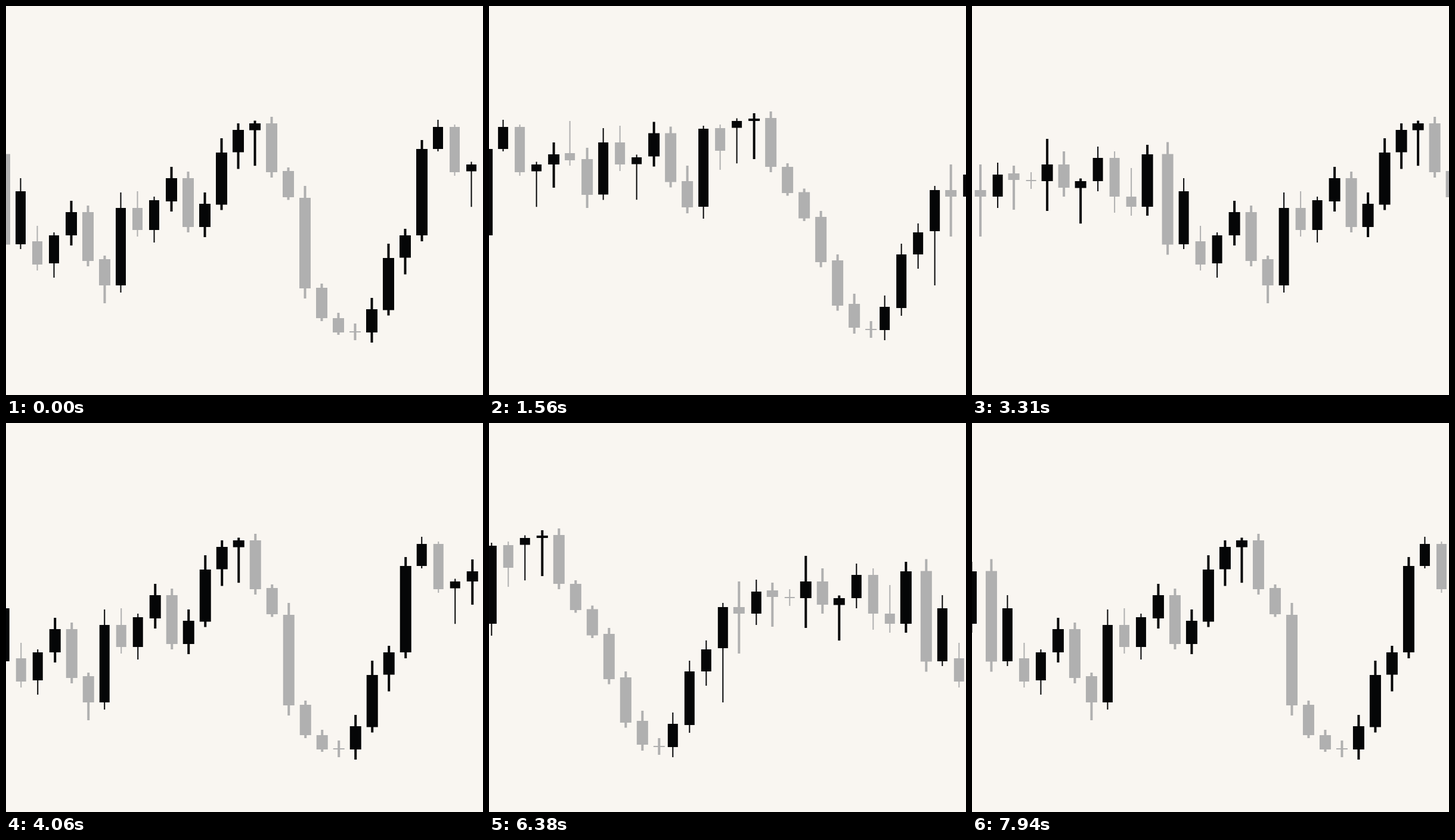
These frames come from a looping animation (800x653 px, 8000 ms). A matplotlib script:

```python
import math

import matplotlib.pyplot as plt
from matplotlib.animation import FuncAnimation
from matplotlib.collections import PolyCollection

W, H, DPI = 800, 653, 64
PAPER, BLACK, GREY = "#f9f6f1", "#050607", "#b0b0b0"
PITCH = 28
LOOP, TICK = 8000, 20      # ms
STEP = 62.5                # ms between visible jumps
SPEED = 14.912             # px per 1/30 s of scroll

# Recurring candles: upper wick, body, lower wick
SPIN = (19, 39, 17)
TALL = (24, 87.5, 9)
FULL = (11, 82, 9)
HAMMER = (4.5, 11.5, 59.7)
DOJI = (13, 2, 13)
SHORT = (6, 44, 4.5)
LOW_TAIL = (11, 37.5, 28)
HIGH_TAIL = (28, 37, 11)
LONG = (20, 152, 17)
DROP = (10, 76, 8.5)

# Each row: colour (b/g, capital = wide cut), top of the body, shape
BASE = [
    ("b", 311, (22, 89, 8)), ("g", 395, (26, 39, 10)), ("b", 385, (5, 47, 24)),
    ("B", 346, SPIN), ("G", 346, FULL), ("G", 425, (6, 44, 30)),
    ("b", 339, (26, 130, 12)), ("g", 339, HIGH_TAIL), ("b", 326, (6, 50, 21)),
    ("B", 289, SPIN), ("G", 289, FULL), ("B", 332, SPIN),
    ("B", 246, TALL), ("B", 208, LOW_TAIL), ("B", 197, HAMMER),
]
DIP = [
    ("G", 197, FULL), ("G", 277, SHORT), ("G", 322, LONG),
    ("G", 473, (7, 51, 5)), ("G", 524, (9, 24, 4)), ("G", 546, DOJI),
    ("B", 509, SPIN), ("B", 423, TALL), ("B", 385, LOW_TAIL),
    ("B", 240, (15, 145, 10)), ("b", 203, (12, 37, 4)),
]
PLATEAU = [
    ("g", 203, (4, 76, 6)), ("b", 266, HAMMER), ("B", 249, (20, 17, 39)),
    ("g", 247, (54, 12, 9)), ("G", 257, (19, 60, 22)), ("b", 229, TALL),
    ("g", 229, HIGH_TAIL), ("b", 254, HAMMER), ("B", 213.5, SPIN),
    ("G", 213.5, FULL), ("G", 294, (26, 44, 10)), ("b", 206, (5, 131, 20)),
    ("g", 205, (6, 38, 32)), ("b", 193, HAMMER), ("B", 189, (9, 4, 64)),
]
SLIDE = [
    ("G", 188, FULL), ("G", 270, SHORT), ("G", 312.5, SHORT),
    ("G", 354, DROP), ("G", 427, DROP), ("G", 500, (17, 40, 10)),
    ("G", 542, DOJI),
]
REBOUND = [
    ("b", 505, SPIN), ("b", 417, (18, 90, 13)), ("b", 380, (15, 37, 24)),
    ("b", 309, (7, 69, 91)), ("G", 309, (43, 11, 67)), ("b", 283, (20, 37, 19)),
    ("G", 281, (13, 11, 50)), ("g", 292, DOJI), ("B", 266, (43, 28, 50)),
    ("G", 266, (22, 39, 15)), ("B", 294, HAMMER), ("b", 255, SPIN),
    ("g", 255, (11, 65, 27)), ("g", 320, (48, 17, 15)), ("B", 249, (16, 88, 15)),
]
LAST = [("G", 248.5, LONG)]


def rect(x, y, w, h):
    return [(x, y), (x + w, y), (x + w, y + h), (x, y + h)]


def candle(x, kind, top, shape, right_aligned):
    up, body, down = shape
    width, wick = (19, 4) if kind.isupper() else (17, 2)
    if right_aligned:
        x += 13 - width
    return [
        rect(x, top, width, body),
        rect(x + (width - wick) / 2, top - up, wick, up + body + down),
    ]


def build_strip():
    """Lay the series end to end often enough for the whole scroll."""
    legs = [BASE, DIP, PLATEAU, SLIDE, REBOUND, LAST]
    count = sum(map(len, legs))
    rects = {"b": [], "g": []}
    for lap in range(-1, 3):
        i = lap * count
        for leg in legs:
            for kind, top, shape in leg:
                x = 16 + PITCH * i
                rects[kind.lower()] += candle(x, kind, top, shape, leg is REBOUND)
                i += 1
    return rects


fig = plt.figure(figsize=(W / DPI, H / DPI), dpi=DPI, facecolor=PAPER)
ax = fig.add_axes([0, 0, 1, 1])
ax.axis("off")
ax.set_ylim(H, 0)

strip = build_strip()
for key, color in (("g", GREY), ("b", BLACK)):
    ax.add_collection(
        PolyCollection(strip[key], facecolor=color, linewidth=0, snap=False),
        autolim=False,
    )


def scroll_at(ms):
    step = int((ms + 4.9) / STEP)
    return SPEED * math.floor(step * STEP * 30 / 1000 + 0.5)


def update(i):
    x = scroll_at(i * TICK)
    ax.set_xlim(x, x + W)
    return ()


update(0)
anim = FuncAnimation(fig, update, frames=LOOP // TICK, interval=TICK,
                     repeat=True, repeat_delay=0, blit=False)
plt.show()
```
